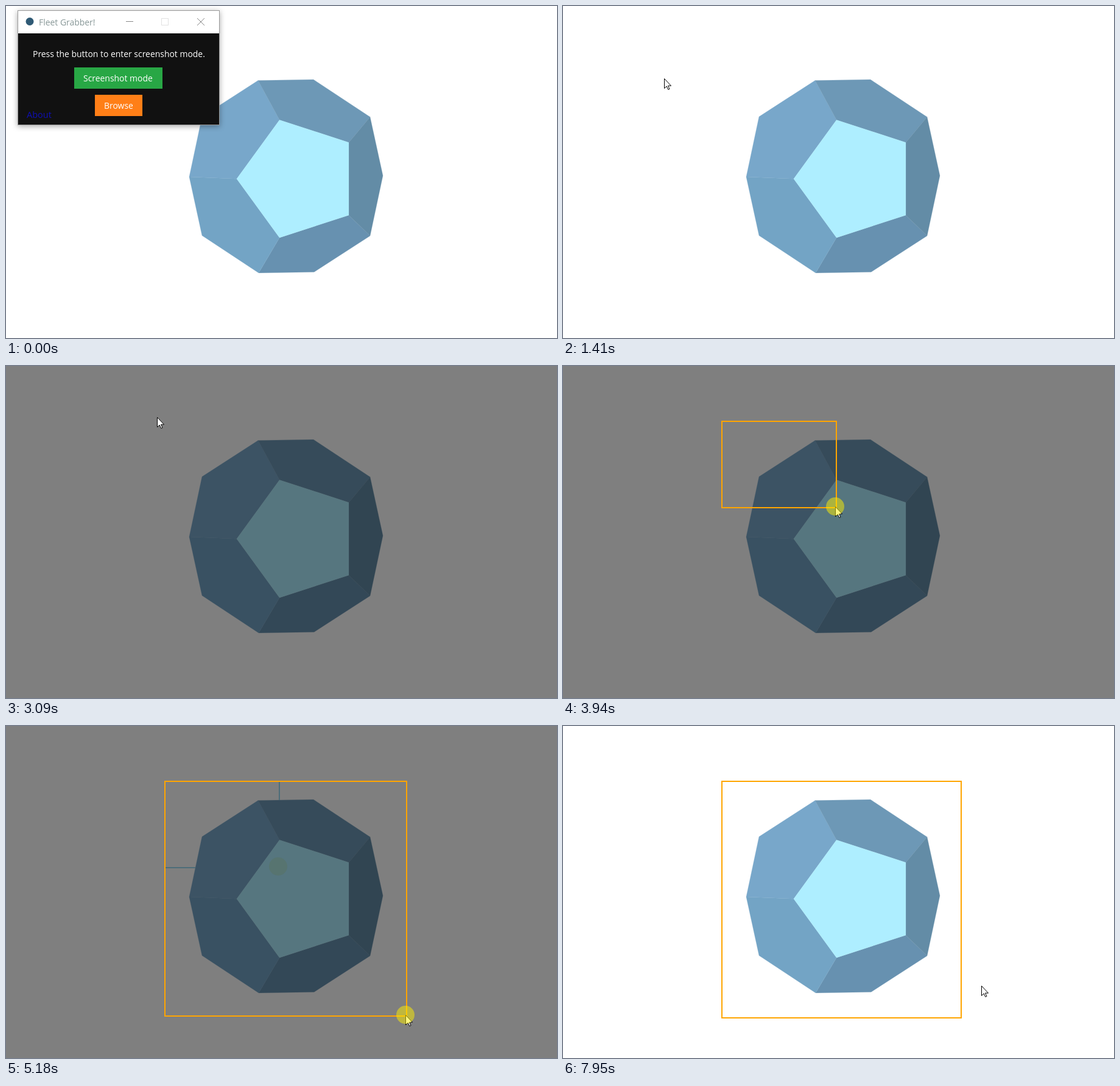
Animation of 905 by 546 pixels, one loop 8000 ms. Source, as an HTML page:

```html
<!DOCTYPE html>
<html lang="en">
<head>
<meta charset="utf-8">
<title>Screenshot tool demo</title>
<style>
  html, body { margin: 0; height: 100%; overflow: hidden; background: #fff; }
  svg { display: block; width: 100vw; height: 100vh; }
  text { font: 13.95px "Open Sans", "Noto Sans", sans-serif; fill: #fff; }
  #window { filter: drop-shadow(0 2px 5px rgba(0, 0, 0, .35)); }
  #window.active { filter: drop-shadow(0 4px 8px rgba(0, 0, 0, .4)); }
  #title { fill: #879797; }
  .active #title { fill: #111; }
  .active #controls, #window:not(.active) #pressed { display: none; }
  #about { font-size: 14.5px; fill: #0f0fb5; }
  .frame { fill: none; stroke: #ffa500; stroke-width: 2; }
</style>
</head>
<body>
<svg viewBox="0 0 905 546">
  <g id="solid"></g>
  <rect id="shade" width="905" height="546" fill="#000" opacity=".5"/>

  <g id="window">
    <rect x="19.5" y="7.5" width="331" height="188" fill="#111" stroke="#999"/>
    <rect x="20" y="8" width="330" height="37" fill="#fff"/>
    <circle cx="39" cy="25.5" r="6.5" fill="#2f5a75"/>
    <text id="title" x="54" y="32">Fleet Grabber!</text>
    <g id="controls" fill="none" stroke="#888">
      <path d="M197 25.5H209M314 20l12 12m0-12l-12 12"/>
      <rect x="255.5" y="20.5" width="11" height="11" stroke="#e2e2e2"/>
    </g>
    <text x="44" y="84">Press the button to enter screenshot mode.</text>
    <rect x="112" y="101" width="145" height="35" fill="#28a745"/>
    <text x="127" y="124">Screenshot mode</text>
    <g id="pressed">
      <rect x="112" y="101" width="145" height="35" fill="#f0f0f0"/>
      <path d="M113 136V102H257" fill="none" stroke="#888" stroke-width="2"/>
      <path d="M256 103V135H114" fill="none" stroke="#fff" stroke-width="2"/>
      <text x="128" y="124.5" style="fill:#222">Screenshot mode</text>
    </g>
    <rect x="146" y="146" width="78" height="35" fill="#ff7f17"/>
    <text x="161" y="169">Browse</text>
    <text id="about" x="34" y="184">About</text>
  </g>

  <g id="trail">
    <path d="M449 92V122M262 233H311" stroke="#4d6d79" stroke-width="2"/>
    <circle cx="447" cy="231" r="15" fill="#577470"/>
  </g>
  <rect id="selection" class="frame" x="261" y="91"/>
  <rect id="capture" class="frame" x="261" y="91" width="393" height="389"/>
  <g id="pointer">
    <path d="M.5 .5V16.5L4.2 13 6.8 18.5 9 17.5 6.5 12.2H11.5Z" fill="#fff" stroke="#000"/>
    <circle id="press" r="15" fill="#fff000" opacity=".5"/>
  </g>
</svg>
<script>
const LOOP = 8000, FRAME = 32;
const ENTER = 230, CLICK = 1180, CLOSED = 1410, SHADE = 1580, DRAG = 3630, RELEASE = 5380;
const el = id => document.getElementById(id);
const show = (id, on) => el(id).setAttribute("display", on ? "inline" : "none");
const set = (id, attributes) => {
  for (const name in attributes) el(id).setAttribute(name, attributes[name]);
};

// Dodecahedron: a regular front pentagon inside a point-symmetric outline
function drawSolid() {
  const front = Array.from({ length: 5 }, (_, k) => {
    const angle = (36 + 72 * k) * Math.PI / 180;
    return [480.7 + 101.7 * Math.cos(angle), 284.2 + 101.7 * Math.sin(angle)];
  });
  const half = [[159, -1], [138, 98], [46, 157.5], [-45, 159], [-138, 97.5]];
  const outline = [...half, ...half.map(([x, y]) => [-x, -y])].map(([x, y]) => [x + 460, y + 280]);
  const polygon = (points, color) =>
    `<polygon points="${points.join(" ")}" fill="${color}" stroke="${color}" stroke-width=".3"/>`;
  const sides = ["#6791b0", "#73a4c5", "#78a7ca", "#6d98b6", "#638ca6"].map((color, k) => {
    const rim = [1, 2, 3].map(i => outline[(2 * k + i) % 10]);
    return polygon([...rim, front[(k + 1) % 5], front[k]], color);
  });
  el("solid").innerHTML = sides.join("") + polygon(front, "#aeeeff");
}

// Pointer moves: start, end, destination; it rests in between
const entry = [156, 11];
const moves = [
  [ENTER, 380, 144, 65], [550, 920, 166, 119],
  [1850, 2060, 260, 102], [2060, 2500, 240, 79], [2800, DRAG - 70, 261, 91],
  [DRAG, 3940, 447, 231], [3940, 4430, 676, 457], [4460, 5180, 656, 475],
  [6660, 7070, 685, 445], [7240, 7360, 691, 431], [7830, 7950, 687, 427],
];

function progress(t, start, end, steps) {
  const p = Math.min(1, Math.max(0, (t - start) / (end - start)));
  return Math.floor(p * steps) / steps;
}

function pointerAt(t) {
  return moves.reduce(([x, y], [start, end, toX, toY]) => {
    const p = progress(t, start, end, Math.round((end - start) / FRAME));
    return [x + (toX - x) * p, y + (toY - y) * p];
  }, entry).map(Math.round);
}

function draw(t) {
  const [x, y] = pointerAt(t);
  const alpha = 1 - progress(t, CLICK, CLOSED, 5) ** 1.5;
  const scale = 1 - (1 - alpha) * .035;
  const dragging = t >= DRAG && t < RELEASE;

  show("shade", t >= SHADE && t < RELEASE);
  show("window", alpha > 0);
  set("window", {
    class: t >= CLICK ? "active" : "",
    opacity: alpha,
    transform: `translate(185 101) scale(${scale}) translate(-185 -101)`,
  });

  show("trail", t >= 3970 && t < RELEASE);
  show("selection", dragging);
  set("selection", { width: Math.max(0, x - 259), height: Math.max(0, y - 89) });
  show("capture", t >= RELEASE);

  show("pointer", t >= ENTER);
  show("press", dragging);
  set("pointer", { transform: `translate(${x} ${y})` });
}

drawSolid();
const origin = performance.now();
function tick() {
  draw((performance.now() - origin) % LOOP);
  requestAnimationFrame(tick);
}
tick();
</script>
</body>
</html>
```
